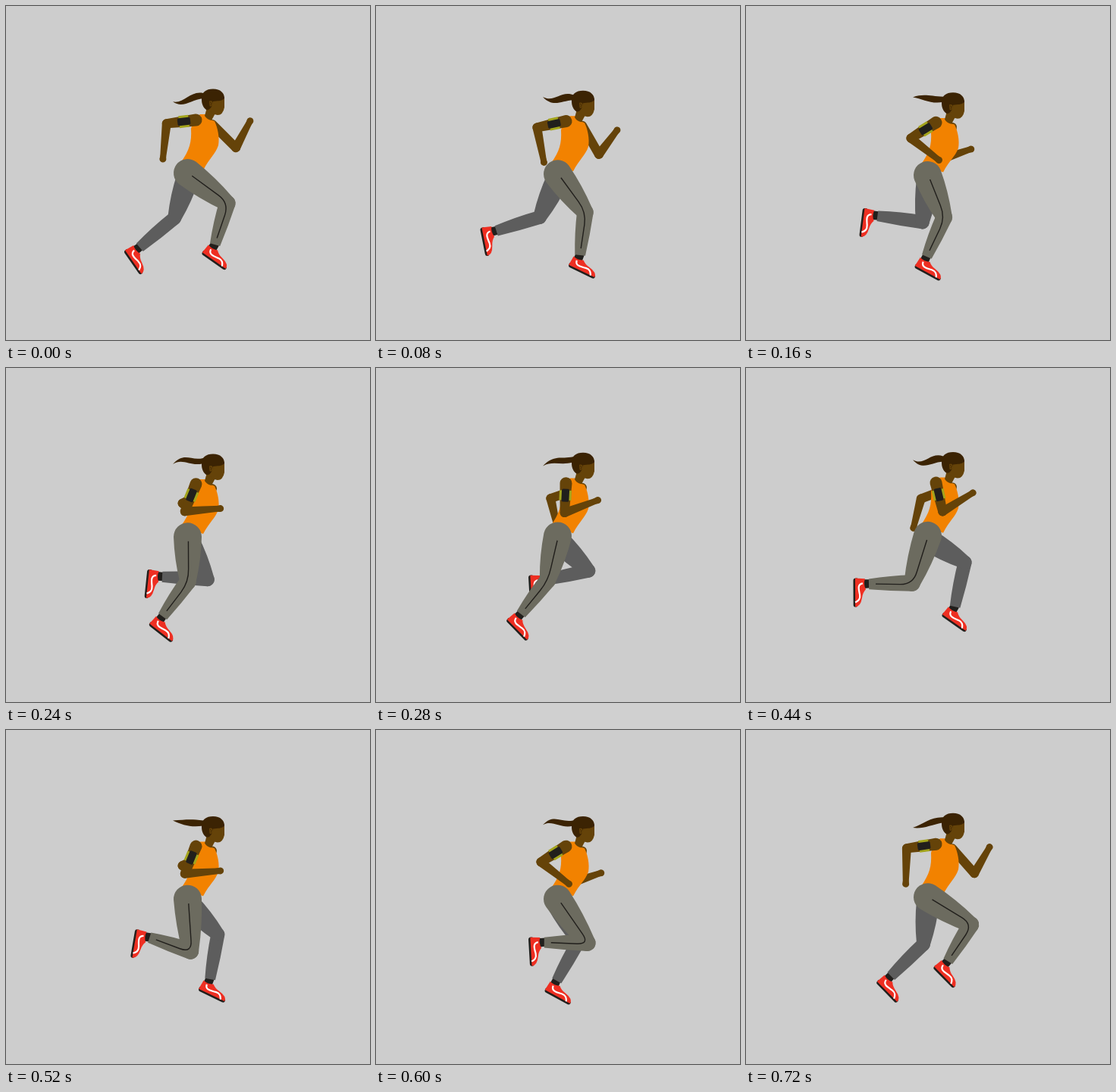
These frames come from a looping animation (480x441 px, 0.76 s). An HTML page with a canvas:

```html
<!DOCTYPE html>
<html lang="en">
<head>
<meta charset="utf-8">
<title>Runner</title>
<style>
  html, body { margin: 0; width: 100%; height: 100%; overflow: hidden; background: #cdcdcd; }
  canvas { display: block; width: 480px; height: 441px; }
</style>
</head>
<body>
<canvas id="stage"></canvas>
<script>
const LOOP = 760, STEP = 40, RAD = Math.PI / 180;
const SKIN = '#654309', HAIR = '#3b2303', SHIRT = '#f28200', NEAR = '#6c6b5f', FAR = '#5d5d5d',
      RED = '#ee2f22', BLACK = '#211f1c', BAND = '#a3a41c';

const canvas = document.getElementById('stage');
const c = canvas.getContext('2d');
const dpr = window.devicePixelRatio || 1;
canvas.width = 480 * dpr;
canvas.height = 441 * dpr;

// Cosine with n swings per loop; shift in degrees
const wave = (t, n, shift = 0) => Math.cos((n * t / LOOP * 360 - shift) * RAD);
const polar = (p, deg, d) => [p[0] + d * Math.cos(deg * RAD), p[1] + d * Math.sin(deg * RAD)];
const angle = (p, q) => Math.atan2(q[1] - p[1], q[0] - p[0]) / RAD;
const toward = (p, q, d) => polar(p, angle(p, q), d);

// The ankle runs round a flattened loop, the foot tilts along with it
const ankleAt = t => [
  218 + 56.3 * wave(t, 1, 10.5) + 3.2 * wave(t, 3, 45),
  306.3 + 29 * wave(t, 1, 76.8) + 3.6 * wave(t, 2, -38) + 1.6 * wave(t, 3, 112)
];
const footTilt = t => 58.3 + 36.6 * wave(t, 1, 239) + 5.3 * wave(t, 2, 148);

// Two-bone joint, bending forwards
function kneeBetween(hip, ankle, thigh, calf) {
  const d = Math.min(Math.hypot(ankle[0] - hip[0], ankle[1] - hip[1]), thigh + calf);
  const bend = Math.acos((thigh * thigh + d * d - calf * calf) / (2 * thigh * d)) / RAD;
  return polar(hip, angle(hip, ankle) - bend, thigh);
}

function shape(color, d) {
  c.fillStyle = color;
  c.fill(new Path2D(d));
}

// Tapered limb; back and front push the sides outward
function limb(color, p, q, r0, r1, back = 0, front = 0, flat = false) {
  const a = angle(p, q) * RAD, H = Math.PI / 2;
  const nx = -Math.sin(a), ny = Math.cos(a);
  const mx = (p[0] + q[0]) / 2, my = (p[1] + q[1]) / 2, r = (r0 + r1) / 2;
  c.fillStyle = color;
  c.beginPath();
  c.arc(...p, r0, a + H, a + 3 * H);
  c.quadraticCurveTo(mx - nx * (r + front), my - ny * (r + front), q[0] - nx * r1, q[1] - ny * r1);
  if (flat) c.lineTo(q[0] + nx * r1, q[1] + ny * r1);
  else c.arc(...q, r1, a - H, a + H);
  c.quadraticCurveTo(mx + nx * (r + back), my + ny * (r + back), p[0] + nx * r0, p[1] + ny * r0);
  c.fill();
}

function shoe(ankle, tilt) {
  c.save();
  c.translate(...ankle);
  c.rotate(tilt * RAD);
  shape(BLACK, 'M-6 -2 L5 -2 L6 9 L-6 9Z');
  shape(BLACK, 'M-8 15 L30 16 Q31 20.5 27 20.5 L-5 20.5 Q-8 20.5 -8 17Z');
  shape(RED, 'M-7 5 Q0 7.5 7 4 Q11 8 18 9 Q30 11 30 18 L-8 18Z');
  c.strokeStyle = '#fff';
  c.lineWidth = 2.2;
  c.stroke(new Path2D('M-1 8 C0 16 8 13 14 12 S22 14 24 18'));
  c.restore();
}

function leg(color, t, hip, thigh, calf, hipR, kneeR) {
  const ankle = ankleAt(t), knee = kneeBetween(hip, ankle, thigh, calf);
  shoe(ankle, footTilt(t));
  limb(color, knee, ankle, kneeR, 6.9, 2, 1, true);
  limb(color, hip, knee, hipR, kneeR, 3, 3);
  return [knee, ankle];
}

function stripe(hip, knee, ankle) {
  const u = toward([0, 0], [knee[0] - hip[0], knee[1] - hip[1]], 2);
  const v = toward([0, 0], [ankle[0] - knee[0], ankle[1] - knee[1]], 2);
  const bend = [knee[0] + u[0] - v[0], knee[1] + u[1] - v[1]];
  c.strokeStyle = BLACK;
  c.lineWidth = 1.4;
  c.beginPath();
  c.moveTo(...toward([hip[0] + 1, hip[1]], knee, 6));
  c.lineTo(...toward(bend, hip, 17));
  c.quadraticCurveTo(...bend, ...toward(bend, ankle, 17));
  c.lineTo(...toward(ankle, knee, 9));
  c.stroke();
}

function arm(shoulder, upper, upperLen, fore, foreLen, r) {
  const elbow = polar(shoulder, upper, upperLen), hand = polar(elbow, fore, foreLen);
  limb(SKIN, shoulder, elbow, r, 6);
  limb(SKIN, elbow, hand, 6, 3.8);
  limb(SKIN, toward(hand, elbow, 4), hand, 3.8, 4.5);
}

function armband(shoulder, upper) {
  c.save();
  c.translate(...polar(shoulder, upper, 16));
  c.rotate(upper * RAD);
  c.fillStyle = BAND;
  c.fillRect(-6.5, -8, 13, 16);
  c.fillStyle = BLACK;
  c.beginPath();
  c.roundRect(-8.5, -5, 17, 10, 2);
  c.fill();
  c.restore();
}

function torso(bob) {
  c.save();
  c.translate(0, 205 + bob * .6);
  c.scale(1, 1 - bob * .4 / 60);
  c.translate(0, -205);
  shape(SHIRT, 'M256 143 L263 143 Q267 150 275 152 C279 160 282 174 280 184 ' +
    'C276 196 268 201 260 217 L231 206 C242 190 245 180 244 162 Q247 147 256 143Z');
  c.restore();
}

function ponytail(t) {
  const tip = 4 + 7 * wave(t, 2, 308), arch = wave(t, 2, 237);
  c.save();
  c.translate(260, 118);
  shape(HAIR, `M0 -3 C-17 ${-4 + 5 * arch} -25 ${tip - 4 - 13 * arch} -40 ${tip} ` +
    `C-27 ${tip + 3 - 12 * arch} -16 ${7 + 2 * arch} 0 4Z`);
  c.restore();
}

function head(t, bob) {
  c.save();
  c.translate(0, bob);
  ponytail(t);
  shape(SKIN, 'M265 134 L277 140 L271 151 Q265 150 262 145Z');
  shape(SKIN, 'M266 119 L288 120 L288 134 Q286 144 279 144 Q272 143 266 136Z');
  shape(HAIR, 'M258 124 C257 114 264 109.5 273 109.5 C283 109.5 288 115 288 122 ' +
    'C284 126 279 125 273 126 L271 133 Q268 138 264 137 C260 134 258 129 258 124Z');
  shape(SKIN, 'M268 125.5 Q273 124 272.5 129 Q271 134 268.5 132Z');
  c.strokeStyle = HAIR;
  c.lineWidth = .8;
  c.stroke(new Path2D('M269 127 Q272 127 270 131'));
  c.restore();
}

function draw(t) {
  const bob = 2.5 - 2.5 * wave(t, 2, -8);
  const hip = [239.5, 220.5 + bob * .6], shoulder = [250.5, 150.5 + bob * .7];
  const upper = 128 + 53 * wave(t, 1) - 8 * wave(t, 2);
  const fore = 25 + 67 * wave(t, 1) + 4 * wave(t, 2);
  const farUpper = 114 - 61 * wave(t, 1) - 14 * wave(t, 2) + 6 * wave(t, 3);
  const farFore = 16 - 92 * wave(t, 1) + 14 * wave(t, 2);

  c.setTransform(dpr, 0, 0, dpr, 0, 0);
  c.fillStyle = '#cdcdcd';
  c.fillRect(0, 0, 480, 441);
  arm([272, 156 + bob * .8], farUpper, 44, farFore, 40, 6);
  leg(FAR, t + 320, [240, 226 + bob * .6], 57, 60, 15, 9);
  torso(bob);
  const joints = leg(NEAR, t, hip, 64.5 + 5.5 * wave(t, 1, 284), 57, 18.5, 10.8);
  stripe(hip, ...joints);
  head(t, bob);
  arm(shoulder, upper, 39, fore, 47, 8);
  armband(shoulder, upper);
}

function tick() {
  draw(Math.floor(performance.now() % LOOP / STEP) * STEP);
  requestAnimationFrame(tick);
}
tick();
</script>
</body>
</html>
```
